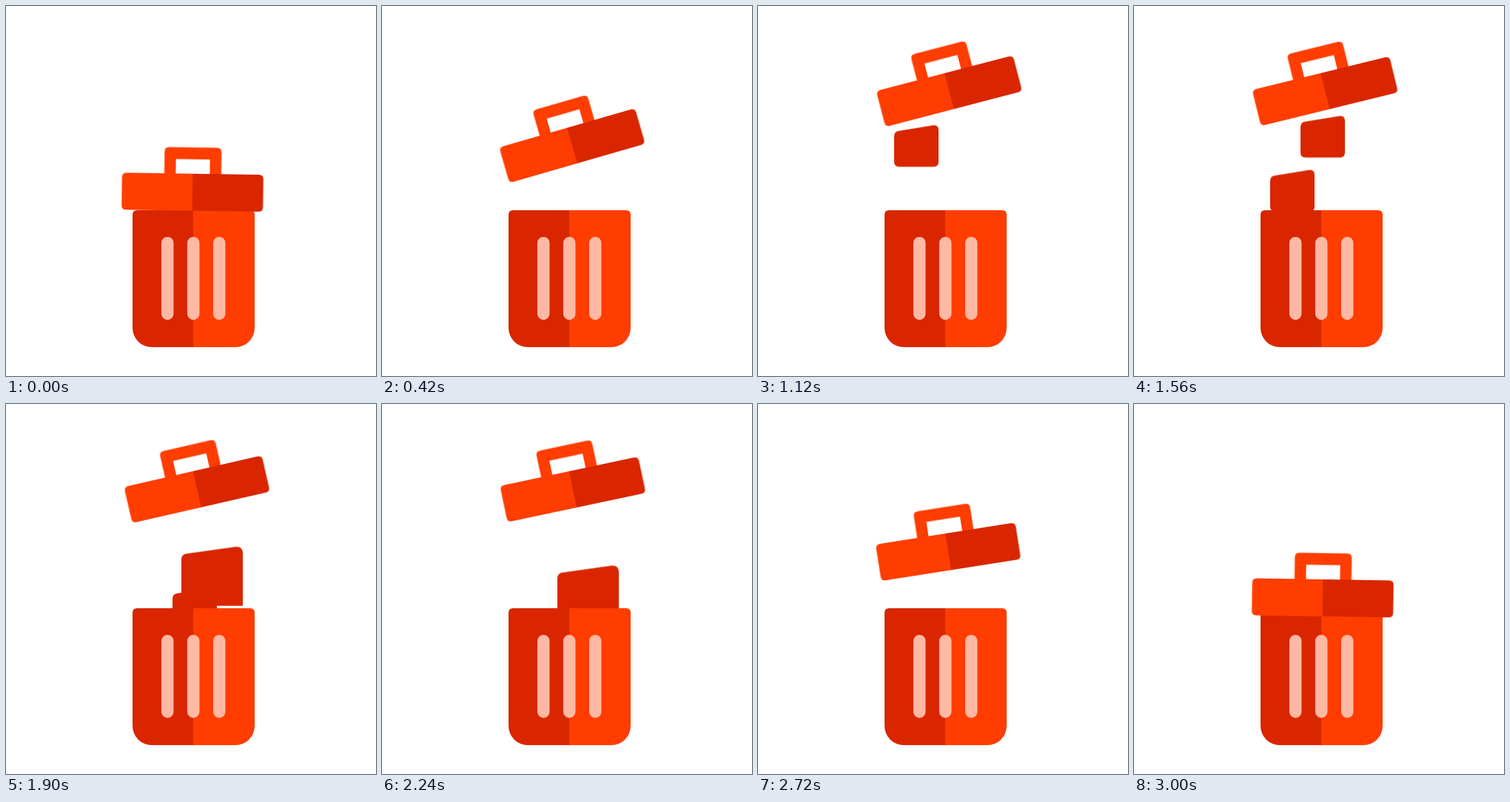
Recreate the animation shown at these times as an HTML page. Size 500 by 500 pixels, loop 3580 ms.

```html
<!DOCTYPE html>
<html lang="en">
<head>
<meta charset="utf-8">
<title>Trash can</title>
<style>
  html, body { margin: 0; width: 100%; height: 100%; overflow: hidden; background: #fff; }
  svg { display: block; width: 100vw; height: 100vh; }
  .light { fill: #ff3d00; }
  .dark { fill: #d92600; }
  .slots { stroke: #ffb8a3; stroke-width: 16.5; stroke-linecap: round; }

  .lid, .scrap { animation: 3580ms linear infinite; }
  .lid { animation-name: lid; }
  .first { animation-name: first; }
  .second { animation-name: second; }
  .third { animation-name: third; }

  /* lift, hover while slowly levelling out, then drop shut */
  @keyframes lid {
    0% { transform: translate(252px, 251.8px) rotate(.9deg); }
    11.732% { transform: translate(257px, 188.8px) rotate(-16.1deg); }
    25.503% { transform: translate(258.3px, 115px) rotate(-15.1deg); }
    31.285% { transform: translate(258.4px, 115px) rotate(-14.6deg); }
    43.575% { transform: translate(258.3px, 115px) rotate(-13.8deg); }
    62.57% { transform: translate(257.9px, 115.4px) rotate(-12deg); }
    65.363% { transform: translate(257.9px, 115.5px) rotate(-11.6deg); }
    75.978% { transform: translate(257.1px, 199.5px) rotate(-9deg); }
    83.799%, 100% { transform: translate(255px, 262px) rotate(.9deg); }
  }

  /* scraps jump out of the can and fall back in */
  @keyframes first {
    0%, 15.084% { transform: translate(184px, 277px); }
    33.24% { transform: translate(184px, 147px); }
    51.397%, 100% { transform: translate(184px, 277px); }
  }
  @keyframes second {
    0%, 31.564% { transform: translate(225px, 277px); }
    43.575% { transform: translate(225px, 148px); }
    55.866%, 100% { transform: translate(225px, 277px); }
  }
  @keyframes third {
    0%, 44.693% { transform: translate(237px, 277px); }
    55.866% { transform: translate(237px, 165px); }
    62.57% { transform: translate(237px, 218px); }
    69.832%, 100% { transform: translate(237px, 277px); }
  }
</style>
</head>
<body>
<svg viewBox="0 0 500 500">
  <defs>
    <path id="chunk" d="M0 15Q0 9 6 8L52 .5Q60-.8 60 7V49.5Q60 56.5 53 56.5H7Q0 56.5 0 49.5Z"/>
  </defs>

  <g class="dark">
    <use href="#chunk" class="scrap first"/>
    <use href="#chunk" class="scrap second"/>
    <path class="scrap third" d="M0 17Q0 10.5 7 9.5L73 .3Q83-1 83 9V80H0Z"/>
  </g>

  <path class="light" d="M253 276H330Q336 276 336 282V435A26 26 0 0 1 310 461H253Z"/>
  <path class="dark" d="M253 276H177Q171 276 171 282V435A26 26 0 0 0 197 461H253Z"/>
  <path class="slots" d="M218.2 320.2V416M253.2 320.2V416M288.2 320.2V416"/>

  <g class="lid">
    <path class="light" d="M-38.5-24V-54.5Q-38.5-60.5-32.5-60.5H32.5Q38.5-60.5 38.5-54.5V-24H23V-44.5H-23V-24Z"/>
    <path class="light" d="M.3-25H-89.5Q-95.5-25-95.5-19V19Q-95.5 25-89.5 25H.3Z"/>
    <path class="dark" d="M0-25H89.5Q95.5-25 95.5-19V19Q95.5 25 89.5 25H0Z"/>
  </g>
</svg>
</body>
</html>
```
